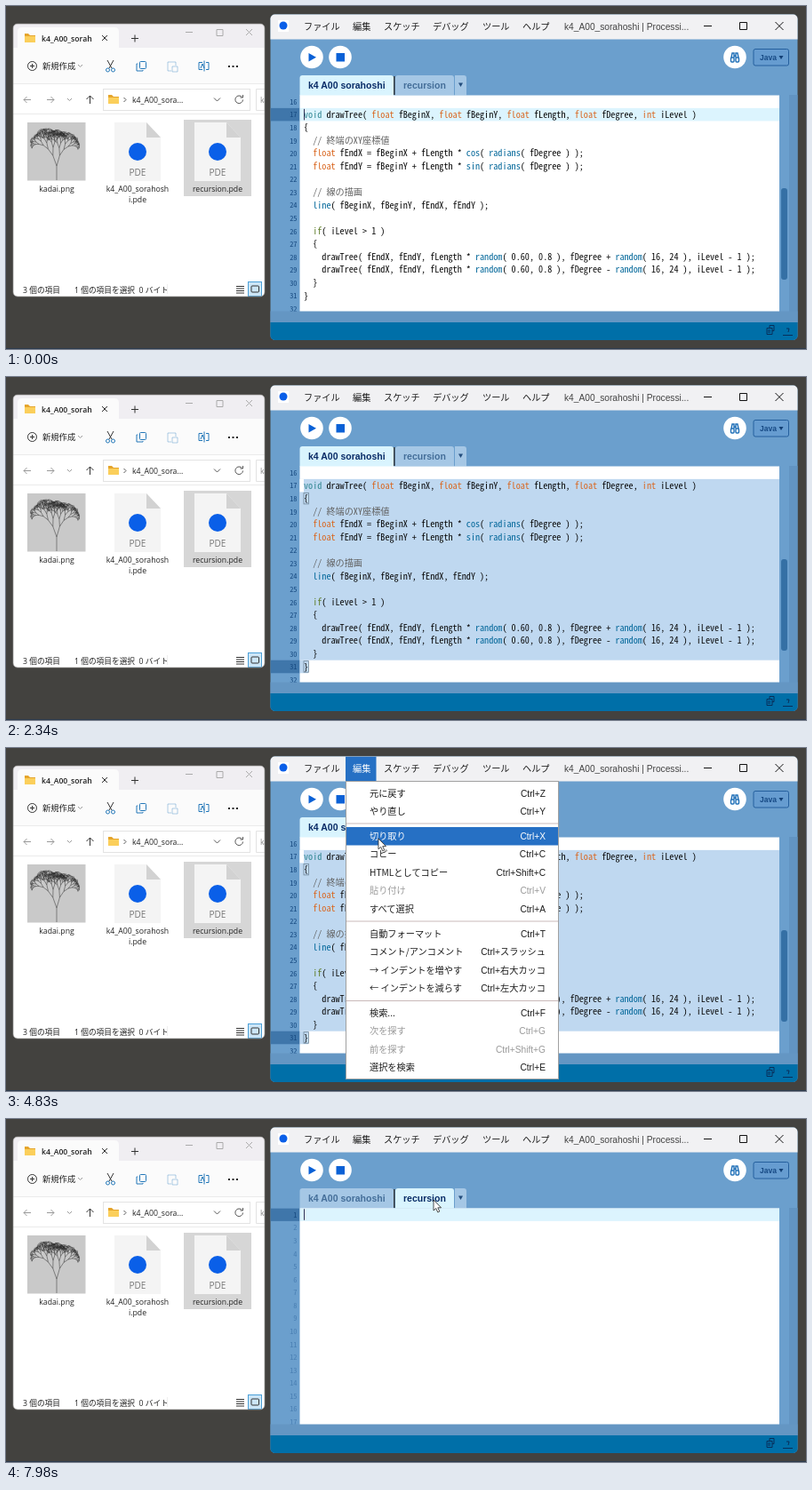
An HTML page for the animation above (8 s loop, 900 by 386 pixels).

```html
<!DOCTYPE html>
<html lang="ja">
<head>
<meta charset="utf-8">
<title>Editor</title>
<style>
html, body { margin: 0; width: 100%; height: 100%; overflow: hidden; background: #43423f; }
svg { display: block; width: 900px; height: 386px; }
text { white-space: pre; }
.ui { font: 8.7px "Open Sans", "Noto Sans CJK JP", "Noto Sans CJK", sans-serif; fill: #222; }
.app { font: 10.2px "Liberation Sans", "Noto Sans CJK JP", "Noto Sans CJK", sans-serif; fill: #1c1c1c; }
.label { font-family: "Noto Sans CJK JP", "Noto Sans CJK", sans-serif; }
.tab { font-weight: bold; font-size: 10.5px; }
.code, .num { font: 10.16px "Noto Sans Mono CJK JP", "Noto Sans CJK JP", "Noto Sans CJK", monospace; fill: #0a0a0a; }
.num { font-size: 8.4px; fill: #174a80; text-anchor: end; }
.dim { fill: #4a7fb3; }
.mid { text-anchor: middle; }
.end { text-anchor: end; }
.off { fill: #9a9a9a; }
.line { fill: none; stroke: #333; stroke-width: 1; }
.comment { fill: #606060; } .string { fill: #6a5a70; } .type { fill: #2f8590; }
.prim { fill: #d9661f; } .flow { fill: #5f7d2a; } .main { fill: #006699; font-weight: bold; }
.func { fill: #006699; } .var { fill: #a04f62; }
</style>
</head>
<body>
<svg viewBox="0 0 900 386">
  <defs>
    <clipPath id="tabClip"><rect x="36" y="26" width="61" height="20"/></clipPath>
    <clipPath id="editClip"><rect x="297.500" y="100.500" width="593" height="243"/></clipPath>
    <clipPath id="appClip"><rect x="297.500" y="9.500" width="593" height="366.500" rx="5"/></clipPath>
    <clipPath id="fileClip"><rect x="8" y="20" width="283" height="307" rx="5"/></clipPath>
    <g id="folder"><path d="M0 1h4l2 2h6v8H0z" fill="#e5a52c"/><path d="M0 4h12v7H0z" fill="#fbcf5b"/></g>
    <g id="pde">
      <path d="M0 0H36L52 17V66H0Z" fill="#f4f4f4"/>
      <path d="M36 0V17H52Z" fill="#d2d2d2"/>
      <circle cx="26" cy="33" r="10" fill="#0a5fe8"/>
      <text class="ui mid" x="26" y="60" style="font-size:10px;fill:#777">PDE</text>
    </g>
  </defs>
  <rect width="900" height="386" fill="#43423f"/>
  <rect y="385" width="900" height="1" fill="#2c3a4c"/>

  <g clip-path="url(#fileClip)">
    <rect x="8" y="20" width="283" height="307" fill="#fff"/>
    <rect x="8" y="20" width="283" height="28" fill="#f0eef2"/>
    <path d="M13 48V29q0-5 5-5H122q5 0 5 5V48Z" fill="#fbfbfb"/>
    <rect x="8" y="47" width="283" height="40" fill="#fbfbfb"/>
    <path d="M8 87.500H291M8 121.500H291" stroke="#ebebeb"/>
    <use href="#folder" x="21" y="30"/>
    <text class="ui" x="40" y="39.500" clip-path="url(#tabClip)" style="font-weight:600">k4_A00_sorahoshi</text>
    <path class="line" d="M108 33l6 6m0-6l-6 6M141 36.500h8m-4-4v8"/>
    <path class="line" style="stroke:#aaa" d="M202 29.500h8M237 26.500h7v7h-7zM270 26l7 7m0-7l-7 7"/>
    <circle class="line" cx="29.500" cy="67.500" r="5"/>
    <path class="line" d="M27 67.500h5m-2.500-2.500v5"/>
    <text class="ui" x="41" y="71" style="font-size:9.300px">新規作成</text>
    <path class="line" style="stroke:#999" d="M81 66l2.500 2.500 2.500-2.500"/>
    <g class="line" style="stroke:#2277b8">
      <path d="M114 61l5 9m2-9l-5 9" stroke="#333"/><circle cx="114.500" cy="72" r="2"/><circle cx="120.500" cy="72" r="2"/>
      <rect x="150.500" y="62.500" width="7" height="8" rx="1"/><path d="M148 65h-1v8h7v-1"/>
      <path opacity=".35" d="M182 63h9v4m-9-4v10h4m1-5h6v6h-6z"/>
      <path d="M221 63.500h-4v8h4m4-8h3v8h-3M223 61.500v12M219 70l2-5 2 5"/>
    </g>
    <path d="M250 68h2m2.500 0h2m2.500 0h2" stroke="#222" stroke-width="2"/>
    <g class="line">
      <path style="stroke:#999" d="M28 105.500h-8m3.500-3.500l-3.500 3.500 3.500 3.500M46 105.500h8m-3.500-3.500l3.500 3.500-3.500 3.500M69 104l2.500 2.500 2.500-2.500"/>
      <path d="M94.500 110v-9m-4 4l4-4 4 4"/>
      <rect x="109.500" y="93.500" width="165" height="24" style="stroke:#e3e3e3"/>
      <path d="M291 93.500h-9.500v24h9.500" style="stroke:#e3e3e3"/>
      <path d="M132.500 103l2.500 2.500-2.500 2.500M234 103.500l3.500 3.500 3.500-3.500M265.500 102.500a4.300 4.300 0 1 0 1 3M266.500 100v3h-3" style="stroke:#555"/>
    </g>
    <use href="#folder" x="115" y="99"/>
    <text class="ui" x="142" y="109">k4_A00_sora...</text>
    <text class="ui" x="286" y="109" style="fill:#888">k4</text>
    <rect x="24" y="131" width="65.500" height="65.500" fill="#c9c9c9"/>
    <path id="tree" fill="none" stroke="#2c2c2c" stroke-width=".5"/>
    <rect x="200" y="128" width="76" height="86" fill="#d6d6d6"/>
    <use href="#pde" x="122" y="131"/>
    <use href="#pde" x="212" y="131"/>
    <g class="ui mid">
      <text x="57" y="209">kadai.png</text>
      <text x="148" y="209">k4_A00_sorahosh</text><text x="148" y="221">i.pde</text>
      <text x="238" y="209">recursion.pde</text>
    </g>
    <text class="ui" x="19" y="322.800">3 個の項目</text>
    <text class="ui" x="77" y="322.800">1 個の項目を選択  0 バイト</text>
    <path d="M181.500 313v11" stroke="#eee"/>
    <path class="line" d="M259 315.500h9m-9 2.500h9m-9 2.500h9m-9 2.500h9"/>
    <rect x="272.500" y="310.500" width="15" height="16" fill="#cce6f7" stroke="#4ca0d8"/>
    <rect class="line" x="276" y="315" width="8.500" height="7" rx="1"/>
  </g>
  <rect x="8" y="20" width="283" height="307" rx="5" fill="none" stroke="#8e8d8c" stroke-width=".7"/>

  <g clip-path="url(#appClip)">
    <rect x="297" y="9" width="594" height="367" fill="#6b9fcd"/>
    <rect x="297" y="9" width="594" height="28.500" fill="#f1f1f3"/>
    <rect x="881" y="100" width="10" height="256" fill="#6294c2"/>
    <rect x="297" y="343.500" width="594" height="12.500" fill="#6496c3"/>
    <rect x="297" y="356" width="594" height="20" fill="#006fa8"/>
    <rect x="306" y="16" width="12" height="13" fill="#fff"/>
    <circle cx="312" cy="22" r="4.500" fill="#0a5fe8"/>
    <rect id="menuTitle" x="382" y="9.500" width="34.500" height="28" fill="#2670c4"/>
    <g class="app">
      <text x="335" y="27">ファイル</text><text id="editTitle" x="390" y="27">編集</text>
      <text x="425" y="27">スケッチ</text><text x="480" y="27">デバッグ</text>
      <text x="536" y="27">ツール</text><text x="581" y="27">ヘルプ</text>
      <text x="628" y="27" style="fill:#444">k4_A00_sorahoshi | Processi...</text>
    </g>
    <path class="line" d="M785 22.500h9M825.500 18.500h8v8h-8zM865.500 18l9 9m0-9l-9 9" style="stroke:#111"/>
    <g fill="#fff"><circle cx="344" cy="57.500" r="12.800"/><circle cx="376" cy="57.500" r="12.800"/><circle cx="820" cy="57.500" r="12.800"/></g>
    <path d="M340.500 53v9.500l8.500-4.750zM371.500 53h9.500v9.500h-9.500z" fill="#0b61d6"/>
    <g class="line" style="stroke:#2070b8;stroke-width:1.400">
      <rect x="815.500" y="58" width="3.500" height="5" rx="1"/><rect x="821" y="58" width="3.500" height="5" rx="1"/>
      <path d="M816 58l1-5h2v5m2 0v-5h2l1 5M819 56h2"/>
    </g>
    <rect x="841" y="48.500" width="39.500" height="18.500" rx="2" fill="#669cd0" stroke="#245f9d"/>
    <text class="app" x="848" y="61" style="font-size:8.500px;font-weight:bold;fill:#174a85">Java</text>
    <path d="M869.500 56h5l-2.500 4z" fill="#123f75"/>
    <path id="tabA" d="M330.500 101V81q0-3 3-3H433q3 0 3 3V101Z"/>
    <path id="tabB" d="M438 100.500V81q0-3 3-3H501q3 0 3 3V100.500Z"/>
    <path d="M505 100.500V78h10q3 0 3 3V100.500Z" fill="#a5c7e5"/>
    <path d="M509 86.500h5l-2.500 4.500z" fill="#234d7c"/>
    <path d="M436.800 79v21" stroke="#333" stroke-width="1.400"/>
    <text class="app tab" id="labelA" x="340" y="93">k4 A00 sorahoshi</text>
    <text class="app tab" id="labelB" x="447" y="93">recursion</text>
    <rect x="330.500" y="100.500" width="539.500" height="243" fill="#fff"/>
    <g id="editor" clip-path="url(#editClip)"></g>
    <path class="line" style="stroke:#082f5a" d="M856 362.500h6v7h-6zM859 362v-2.500h5v6h-2M857 365h3m-3 2h3M874 370.500h11M878 363h3l-1 4"/>
  </g>
  <g id="menu"></g>
  <g id="beam"><path d="M-4-5.500h3l1 1 1-1h3M0-4.500v10M-4 6.500h3l1-1 1 1h3" fill="none" stroke="#fff" stroke-width="2.600"/><path d="M-4-5.500h3l1 1 1-1h3M0-4.500v10M-4 6.500h3l1-1 1 1h3" fill="none" stroke="#111" stroke-width="1.100"/></g>
  <path id="arrow" d="M0 0V12L2.700 9.500 4.800 14 6.800 13 4.800 8.800H8.500Z" fill="#fff" stroke="#222" stroke-width=".8"/>
</svg>
<script>
const $ = id => document.getElementById(id);
const LOOP = 8000, ROW = 14.56, TOP = 100.3, EDGE = 330.5, LEFT = 335, CHAR = 5.08, RIGHT = 870;

const header = `





void draw()
{
  background( 204 );  // スクリーンリフレッシュ用

  // 最初の再帰呼び出し
  drawTree( width/2, height, 80, -90, 12 );

  save("kadai.png");  // png保存
}
`.split('\n');
const treeCode = `void drawTree( float fBeginX, float fBeginY, float fLength, float fDegree, int iLevel )
{
  // 終端のXY座標値
  float fEndX = fBeginX + fLength * cos( radians( fDegree ) );
  float fEndY = fBeginY + fLength * sin( radians( fDegree ) );

  // 線の描画
  line( fBeginX, fBeginY, fEndX, fEndY );

  if( iLevel > 1 )
  {
    drawTree( fEndX, fEndY, fLength * random( 0.60, 0.8 ), fDegree + random( 16, 24 ), iLevel - 1 );
    drawTree( fEndX, fEndY, fLength * random( 0.60, 0.8 ), fDegree - random( 16, 24 ), iLevel - 1 );
  }
}`.split('\n');
const footer = ['', 'void mouseClicked()', '{', '  redraw();', '}'];
const fullDoc = [...header, ...treeCode, ...footer];
const cutDoc = [...header, '', ...footer];
const emptyDoc = [''];
const bracePairs = { 18: 31, 31: 18, 27: 30, 30: 27, 34: 36, 36: 34 };

const kinds = ['comment', 'string', 'type', 'prim', 'flow', 'main', 'func', 'var'];
const syntax = /(\/\/.*)|(".*?")|\b(void)\b|\b(float|int)\b|\b(if)\b|\b(draw|mouseClicked)\b|\b(cos|sin|radians|line|random|redraw|background|save)\b|\b(width|height)\b/g;
const paint = line => line.replace(syntax, (word, ...groups) =>
  `<tspan class="${kinds[groups.findIndex(g => g !== undefined)]}">${word}</tspan>`);
const rect = (x, y, w, h, fill, extra = '') =>
  `<rect x="${x}" y="${y}" width="${w}" height="${h}" fill="${fill}" ${extra}/>`;

// [time, x, y]; the pointer is hidden outside these spans
const paths = [
  [[60, 336, 122], [550, 371, 350], [830, 371, 350], [1110, 371, 296], [1560, 371, 253], [1720, 371, 253]],
  [[2520, 371, 253], [3250, 402, 35], [4250, 402, 35], [4850, 419, 102], [5880, 419, 102]],
  [[6680, 419, 200], [7400, 481, 91], [8000, 481, 91]]
];
const OPEN = 3450, CUT = 5100, CHECK = 5900, SWITCH = 7560;
const clamp = (v, a, b) => Math.min(b, Math.max(a, v));
const ramp = (t, t0, t1, a, b) => a + (b - a) * clamp((t - t0) / (t1 - t0), 0, 1);

function pointerAt(t) {
  const path = paths.find(p => t >= p[0][0] && t < p[p.length - 1][0]);
  if (!path) return null;
  const i = path.findIndex(p => p[0] > t), [t0, x0, y0] = path[i - 1], [t1, x1, y1] = path[i];
  const k = (t - t0) / (t1 - t0), e = k * k * (3 - 2 * k);
  return { x: x0 + (x1 - x0) * e, y: y0 + (y1 - y0) * e };
}

function topLine(t) {
  if (t >= SWITCH) return 1;
  if (t >= CUT) return Math.round(ramp(t, 5900, 6480, 16, 6));
  return Math.round(t < 1700 ? ramp(t, 520, 790, 16, 21) : ramp(t, 1750, 2280, 21, 16));
}

function caretAt(t) {
  if (t >= SWITCH) return { line: 1, col: 0 };
  if (t >= CUT || t < 60) return { line: 17, col: 0 };
  const dragTime = Math.min(t, 1600), mouse = pointerAt(dragTime);
  const line = clamp(topLine(dragTime) + Math.floor((mouse.y - TOP) / ROW), 17, 36);
  return { line, col: clamp(Math.round((mouse.x - LEFT) / CHAR), 0, fullDoc[line - 1].length) };
}

function selectionMarkup(top, caret, caretX, rowY) {
  const color = '#bfd8f0', first = Math.max(17, top), y = rowY(caret.line);
  const lastX = caret.line === 17 ? LEFT : EDGE;
  let out = rect(lastX, y, caretX - lastX, ROW, color);
  if (caret.line > first) out += rect(EDGE, rowY(first), RIGHT - EDGE, y - rowY(first), color);
  if (caret.line > 17 && top <= 17) out += rect(EDGE, rowY(17), LEFT - EDGE, ROW, '#fff');
  return out;
}

function editorMarkup(t) {
  const doc = t >= SWITCH ? emptyDoc : t >= CUT ? cutDoc : fullDoc;
  const top = topLine(t), caret = caretAt(t), rowY = n => TOP + (n - top) * ROW;
  const caretX = LEFT + caret.col * CHAR;
  const selecting = doc === fullDoc && (caret.line > 17 || caret.col > 0);
  let out = rect(297, rowY(caret.line), EDGE - 297, ROW, '#3f76aa');
  out += selecting ? selectionMarkup(top, caret, caretX, rowY)
    : rect(EDGE, rowY(caret.line), RIGHT - EDGE, ROW, '#dcf4fe');
  for (let n = top; n < top + 17; n++) {
    const y = rowY(n), line = doc[n - 1];
    out += `<text class="num ${line === undefined ? 'dim' : ''}" x="327.500" y="${y + 10.6}">${n}</text>`;
    if (line) out += `<text class="code" x="${LEFT}" y="${y + 10.9}">${paint(line)}</text>`;
  }
  const pair = bracePairs[caret.line];
  if (selecting && pair && caret.col === doc[caret.line - 1].length) {
    for (const n of [caret.line, pair])
      out += rect(caretX - CHAR, rowY(n) + 1, 5.5, 12.5, 'none', 'stroke="#6f8799" stroke-width=".8"');
  }
  const blink = t >= SWITCH || Math.floor(t / 500) % 2 === 0;
  if (!selecting && blink) out += rect(LEFT, rowY(caret.line) + 1, 1, 12.5, '#335');
  if (doc === cutDoc && t >= CHECK) {
    const wave = `M345 ${rowY(12) + 13}` + 'q1-1.600 2 0t2 0'.repeat(10);
    out += `<path d="${wave}" fill="none" stroke="#a5372c" stroke-width=".9"/>` + rect(882, 185, 8, 1.4, '#8d4a38');
  }
  if (doc !== emptyDoc) {
    const y = doc === fullDoc ? 205 + (top - 16) * 6.8 : 268 + (top - 16) * 11;
    out += rect(872, y, 7, doc === fullDoc ? 103 : 73, '#3570a5', 'rx="3"');
  }
  return out;
}

// [centre y, label, shortcut, disabled]
const menuItems = [
  [51, '元に戻す', 'Z'], [71, 'やり直し', 'Y'], [99, '切り取り', 'X'], [119.5, 'コピー', 'C'],
  [140, 'HTMLとしてコピー', 'Shift+C'], [160, '貼り付け', 'V', 1], [181, 'すべて選択', 'A'],
  [209, '自動フォーマット', 'T'], [229.5, 'コメント/アンコメント', 'スラッシュ'],
  [250, '→ インデントを増やす', '右大カッコ'], [270, '← インデントを減らす', '左大カッコ'],
  [298, '検索...', 'F'], [318.5, '次を探す', 'G', 1], [339, '前を探す', 'Shift+G', 1], [359.5, '選択を検索', 'E']
];
function menuMarkup(mouse) {
  let out = rect(382.5, 37.5, 239, 335, '#fff', 'stroke="#a0a0a0"');
  for (const y of [84.5, 194.5, 284]) out += rect(383, y, 238, 1, '#c9b9b9');
  for (const [y, label, key, disabled] of menuItems) {
    const hover = mouse && mouse.y > 41 && Math.abs(mouse.y - y) < 10.2;
    if (hover) out += rect(383, y - 10, 238, 20.5, '#2670c4');
    const attrs = `y="${y + 3.8}"` + (hover ? ' style="fill:#fff"' : '');
    const cls = 'app' + (disabled ? ' off' : '');
    out += `<text class="${cls} label" x="409" ${attrs}>${label}</text><text class="${cls} end" x="607" ${attrs}>Ctrl+${key}</text>`;
  }
  return out;
}

let seed = 7;
const random = (a, b) => {
  seed = seed * 16807 % 2147483647;
  return a + (b - a) * seed / 2147483647;
};
function treePath(x, y, degree, length, level) {
  const a = degree * Math.PI / 180, ex = x + length * Math.cos(a), ey = y + length * Math.sin(a);
  const step = `M${x.toFixed(1)} ${y.toFixed(1)}L${ex.toFixed(1)} ${ey.toFixed(1)}`;
  if (level < 2) return step;
  return step + [1, -1].map(side =>
    treePath(ex, ey, degree + side * random(16, 24), length * random(.64, .78), level - 1)).join('');
}
$('tree').setAttribute('d', treePath(57, 196, -90, 16, 10));

const drawn = {};
function update(id, markup) {
  if (drawn[id] !== markup) $(id).innerHTML = drawn[id] = markup;
}
const show = (id, on) => $(id).setAttribute('visibility', on ? 'visible' : 'hidden');

function render(t) {
  const mouse = pointerAt(t), open = t >= OPEN && t < CUT, second = t >= SWITCH;
  update('editor', editorMarkup(t));
  update('menu', open ? menuMarkup(mouse) : '');
  show('menuTitle', open);
  $('editTitle').style.fill = open ? '#fff' : '';
  for (const [name, active] of [['A', !second], ['B', second]]) {
    $('tab' + name).setAttribute('fill', active ? '#d9f4fe' : '#a5c7e5');
    $('label' + name).style.fill = active ? '#082b66' : '#446e99';
  }
  const inText = mouse && !open && mouse.y > 100;
  show('beam', inText);
  show('arrow', mouse && !inText);
  if (mouse) for (const id of ['beam', 'arrow'])
    $(id).setAttribute('transform', `translate(${mouse.x} ${mouse.y})`);
}

const start = performance.now();
function frame() {
  render((performance.now() - start) % LOOP);
  requestAnimationFrame(frame);
}
frame();
</script>
</body>
</html>
```
